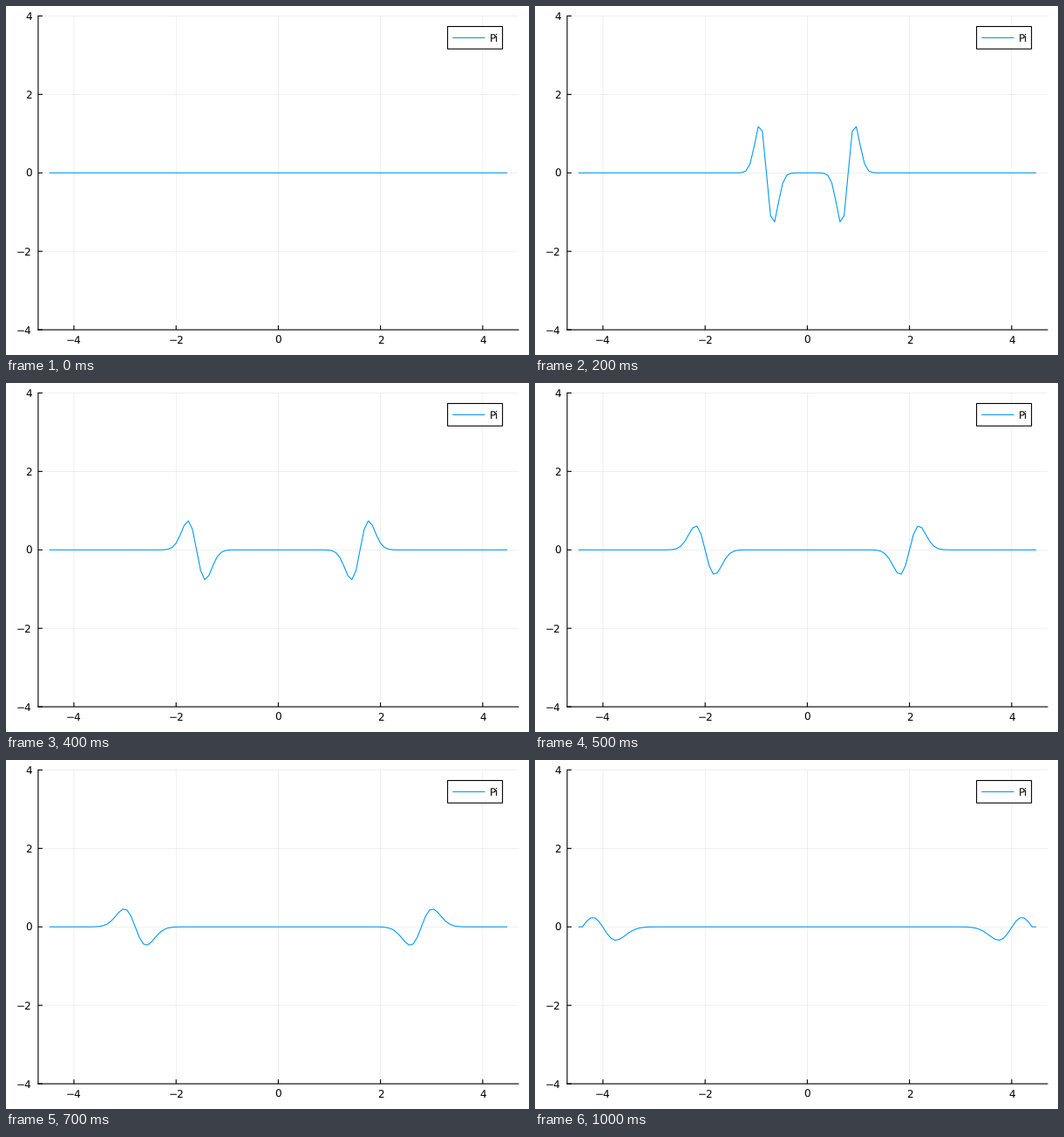
Animation of 600x400 px, one loop 1050 ms. Source, as a matplotlib script:

```python
import numpy as np
import matplotlib.pyplot as plt
from matplotlib.animation import FuncAnimation
from matplotlib.patches import Rectangle

W, H, DPI = 600, 400, 100
FRAMES, INTERVAL = 21, 50
LEFT, RIGHT, TOP, BOTTOM = 36.9, 587.9, 11.4, 371.1
BLUE = "#009AFA"
PX = 72 / DPI
FONT = 12 * PX
THIN = 1.1 * PX

plt.rcParams.update({
    "font.family": "DejaVu Sans",
    "text.hinting": "none",
    "path.snap": False,
    "lines.solid_capstyle": "butt",
})

DX = 0.08
WALL = 4.4
x = DX * np.arange(-56, 57)


def pulse(r, t):
    """Spreading slope of a Gaussian that moves outward at unit speed."""
    var = 0.005 + 0.0147 * t
    d = r - t
    amp = 0.5 * np.sqrt(0.005) * var ** -1.5
    return amp * d * np.exp(-d * d / (2 * var)) * (1 - 0.14 * d / t)


def field(t):
    if t == 0:
        return np.zeros_like(x)
    y = pulse(x, t) + pulse(-x, t)
    # reflection at the fixed walls
    y -= pulse(2 * WALL - x, t) + pulse(2 * WALL + x, t)
    y[np.abs(x) > WALL - DX / 2] = 0
    return y


fig = plt.figure(figsize=(W / DPI, H / DPI), dpi=DPI, facecolor="white")
ax = fig.add_axes([LEFT / W, 1 - BOTTOM / H, (RIGHT - LEFT) / W, (BOTTOM - TOP) / H])
ticks = np.arange(-4, 5, 2)
ax.set(xlim=(-4.7, 4.7), ylim=(-4, 4), xticks=ticks, yticks=ticks)
ax.set_axisbelow(True)
ax.grid(color="black", alpha=0.1, lw=0.6 * PX)
ax.tick_params(length=0, labelsize=FONT)
ax.tick_params(axis="x", pad=7 * PX)
ax.tick_params(axis="y", pad=7.3 * PX)
for side in ("top", "right"):
    ax.spines[side].set_visible(False)
for side in ("left", "bottom"):
    ax.spines[side].set_linewidth(THIN)

# inward tick marks
mark = dict(color="black", lw=THIN, clip_on=False)
ax.vlines(ticks, 0, 5 / (BOTTOM - TOP), transform=ax.get_xaxis_transform(), **mark)
ax.hlines(ticks, 0, 5 / (RIGHT - LEFT), transform=ax.get_yaxis_transform(), **mark)

line, = ax.plot(x, field(0), color=BLUE, lw=THIN)

# legend, laid out in pixels
key = fig.add_axes([0, 0, 1, 1])
key.set(xlim=(0, W), ylim=(H, 0))
key.axis("off")
key.add_patch(Rectangle((506.6, 23.5), 63, 25.7, fc="white", ec="black", lw=THIN))
key.plot([512.3, 549.5], [36.4, 36.4], color=BLUE, lw=THIN)
key.text(554.5, 41.2, "Pi", size=FONT, va="baseline")


def update(i):
    line.set_ydata(field(0.2 * i))
    return line,


anim = FuncAnimation(fig, update, frames=FRAMES, interval=INTERVAL,
                     repeat=True, repeat_delay=0)
plt.show()
```
